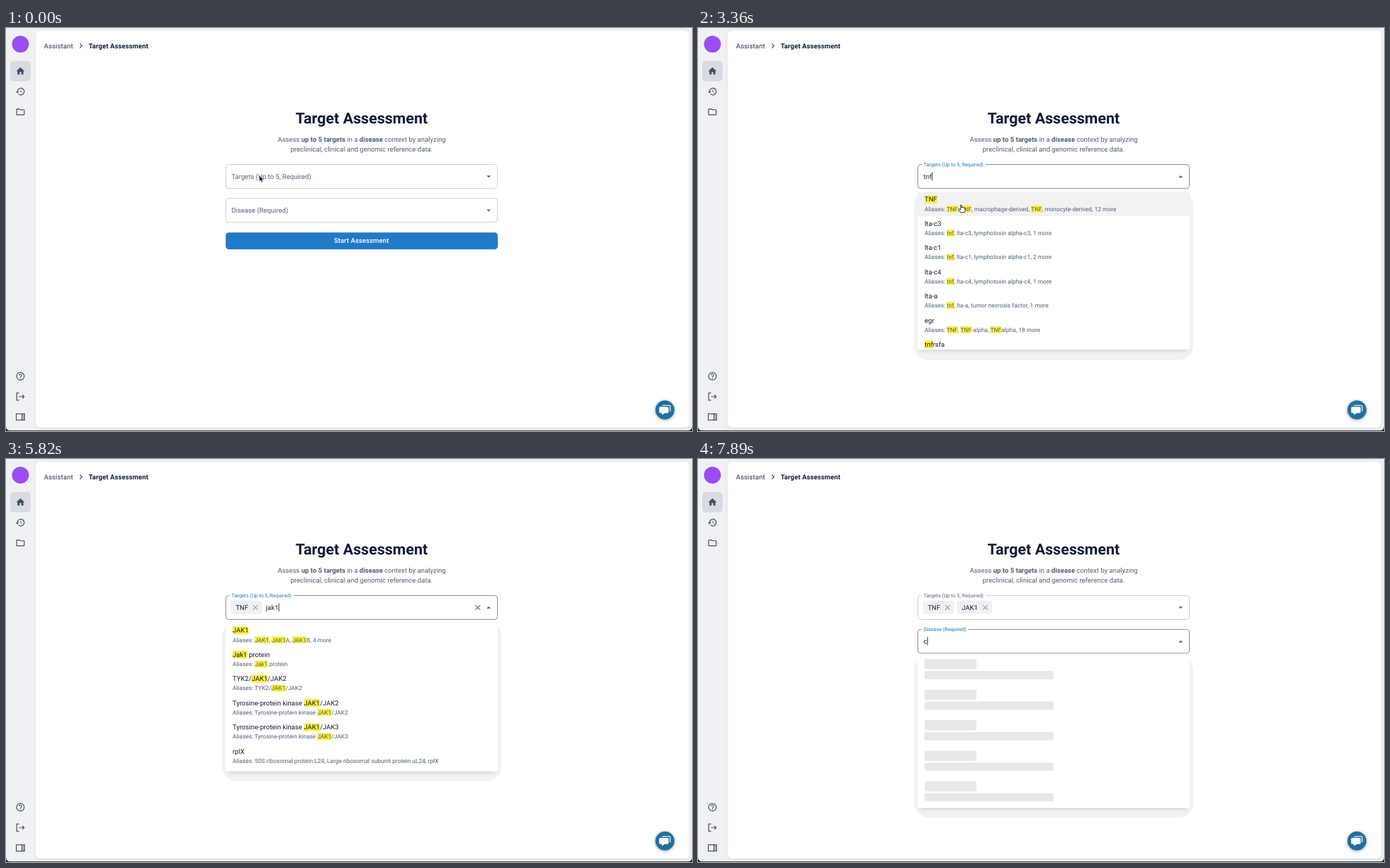
Animation, 975 px wide and 574 px high, one loop 8000 ms. Source, as an HTML page:

```html
<!DOCTYPE html>
<html lang="en">
<head>
<meta charset="utf-8">
<title>Target Assessment</title>
<style>
html, body { margin: 0; width: 975px; height: 574px; overflow: hidden; background: #15171c; }
body { position: relative; text-rendering: geometricPrecision; }
svg { position: absolute; left: 0; top: 0; font-family: Roboto, sans-serif; font-size: 9.6px; }
#halo, #menu { position: absolute; display: none; }
#halo { left: 307px; width: 397px; border-radius: 21px; background: rgba(0,0,0,.05); }
#menu { left: 312px; width: 387px; background: #fff; overflow: hidden; border-radius: 2.4px;
  box-shadow: 0 6px 5px -4px rgba(0,0,0,.13); }
#list text { white-space: pre; }
</style>
</head>
<body>
<svg id="page" width="975" height="574" viewBox="0 0 975 574">
  <defs>
    <filter id="soft" x="-30%" y="-30%" width="160%" height="160%"><feGaussianBlur stdDeviation="2"/></filter>
  </defs>
  <path d="M0 0H975V567Q975 573.3 969 573.3H6Q0 573.3 0 567Z" fill="#f0f1f4"/>
  <rect x="42" y="4" width="929" height="566" rx="7" fill="#ccd0d8" opacity=".7" filter="url(#soft)"/>
  <rect x="42" y="3.5" width="929" height="565.5" rx="7" fill="#fff"/>
  <circle cx="20.5" cy="23" r="12" fill="#9a4df0"/>
  <rect x="6" y="47" width="29" height="29" rx="5" fill="#d9dbe1"/>
  <g id="icons" fill="#424f67"></g>
  <g fill="none" stroke="#424f67" stroke-width="1.2">
    <path d="M18.6 519.8H15.2V530.2H18.6M18.4 525H25.6M23.2 522.3L25.9 525L23.2 527.7"/>
    <rect x="14.6" y="549.5" width="11.8" height="9"/>
    <path d="M22.6 549.5V558.5"/>
    <path d="M24.5 550.8V557.6" stroke-width="1.3" stroke-dasharray="1.6 1"/>
  </g>
  <text x="54" y="28.5" fill="#27324a" letter-spacing=".13">Assistant</text>
  <path d="M105 22.3l3 3.2-3 3.2" fill="none" stroke="#3c475c" stroke-width="1.2"/>
  <text x="117.4" y="28.5" font-weight="700" fill="#131d38" letter-spacing=".08">Target Assessment</text>
  <g text-anchor="middle">
    <text x="505.4" y="136" font-size="21.6" font-weight="700" fill="#111b38">Target Assessment</text>
    <g fill="#4f5b74">
      <text x="505.6" y="161.5">Assess <tspan font-weight="700">up to 5 targets</tspan> in a <tspan font-weight="700">disease</tspan> context by analyzing</text>
      <text x="505.4" y="176">preclinical, clinical and genomic reference data.</text>
    </g>
    <rect x="312.3" y="291.3" width="386.6" height="24" rx="4.5" fill="#217ac6"/>
    <text x="505.2" y="306.2" font-weight="500" fill="#fff" letter-spacing=".08">Start Assessment</text>
  </g>
  <g id="fields"></g>
  <circle cx="936.5" cy="544.8" r="14" fill="#000" opacity=".3" filter="url(#soft)"/>
  <circle cx="936.5" cy="544" r="13.5" fill="#20719f"/>
  <path d="M932.5 537.5H942.5Q944 537.5 944 539V546" fill="none" stroke="#fff" stroke-width="1.2"/>
  <path d="M930 539.5H940Q941.8 539.5 941.8 541.3V546.7Q941.8 548.5 940 548.5H936L932.3 551.3V548.5H930Q928.3 548.5 928.3 546.7V541.3Q928.3 539.5 930 539.5Z" fill="#fff"/>
</svg>
<div id="halo"></div>
<div id="menu"><svg id="list" width="387" height="230"></svg></div>
<svg width="975" height="574" viewBox="0 0 975 574">
  <g id="cursor">
    <circle id="ring" r="9.2" fill="none" stroke="#0c0d10" stroke-width="2"/>
    <path id="arrow" d="M0 0V8.6L2 6.8 3.4 10 5 9.3 3.6 6.2H6.3Z" fill="#000" stroke="#fff" stroke-width=".7"/>
    <g id="beam" fill="none">
      <path d="M-2.3-5Q0-5 0-3.8Q0-5 2.3-5M0-4V4M-2.3 5Q0 5 0 3.8Q0 5 2.3 5M-1.4 1H1.4" stroke="#fff" stroke-width="2" opacity=".7"/>
      <path d="M-2.3-5Q0-5 0-3.8Q0-5 2.3-5M0-4V4M-2.3 5Q0 5 0 3.8Q0 5 2.3 5M-1.4 1H1.4" stroke="#111" stroke-width="1"/>
    </g>
    <path id="hand" d="M-.8 6V.8Q0-.6 .8.8V4Q1.8 3.2 2.5 4.2Q3.6 3.6 4.2 4.7Q5.6 4.3 5.6 5.8V8L4.6 11H-.6L-3.6 6.9Q-3.6 5.4-2.3 5.8L-.8 7.2Z" fill="#fff" stroke="#111" stroke-width=".9"/>
  </g>
</svg>
<script>
const LOOP = 8000, STEP = 30, BLINK = 480;
const $ = id => document.getElementById(id);

function add(parent, tag, attrs, text) {
  const el = document.createElementNS('http://www.w3.org/2000/svg', tag);
  set(el, attrs);
  if (text) el.textContent = text;
  return parent.appendChild(el);
}
function set(el, attrs) {
  for (const k in attrs) el.setAttribute(k, attrs[k]);
}
const show = (el, on) => { el.style.display = on ? '' : 'none'; };

// Sidebar icons on a 24 unit grid
[
  [61.5, 'M10 20v-6h4v6h5v-8h3L12 3 2 12h3v8z'],
  [90.5, 'M13 3a9 9 0 0 0-9 9H1l4 4 4-4H6a7 7 0 1 1 2.06 4.94l-1.42 1.42A9 9 0 1 0 13 3zm-1 5v5l4.28 2.54.72-1.21-3.5-2.08V8z'],
  [119.5, 'M9.17 6l2 2H20v10H4V6h5.17M10 4H4a2 2 0 0 0-2 2v12a2 2 0 0 0 2 2h16a2 2 0 0 0 2-2V8a2 2 0 0 0-2-2h-8z'],
  [496, 'M11 18h2v-2h-2zM12 2a10 10 0 1 0 0 20 10 10 0 0 0 0-20zm0 18a8 8 0 1 1 0-16 8 8 0 0 1 0 16zm0-14a4 4 0 0 0-4 4h2a2 2 0 0 1 4 0c0 2-3 1.75-3 5h2c0-2.25 3-2.5 3-5a4 4 0 0 0-4-4z']
].forEach(([y, d]) => add($('icons'), 'path', { d, transform: `translate(13.3 ${y - 7.2}) scale(.6)` }));

// Schedules: value holds from its time on
const typed = [[0, ''], [1590, 't'], [1950, 'tn'], [2100, 'tnf'], [3660, ''], [4860, 'j'],
  [4980, 'ja'], [5070, 'jak'], [5370, 'jak1'], [6720, ''], [7890, 'c']];
const menus = [[0, ''], [720, 'hint'], [1590, 'wait'], [2610, 'tnf'], [3660, ''], [4350, 'hint'],
  [4860, 'wait'], [5820, 'jak1'], [6720, ''], [7290, 'hint'], [7890, 'wait']];
const focus = [[0, -1], [660, 0], [7230, 1]];
const kinds = [[0, 'arrow'], [300, 'beam'], [1620, ''], [3000, 'beam'], [3150, 'hand'], [3660, 'beam'],
  [4860, ''], [6150, 'beam'], [6660, 'hand'], [6720, 'beam'], [7890, '']];
const presses = [[660, 810], [3540, 3660], [4290, 4380], [6660, 6720], [7230, 7380]];
const extraBlinks = [660, 4320, 7230];
const path = [[0, 360, 210], [270, 360, 210], [360, 342, 210.5], [3000, 342, 210.5], [3330, 374, 251.8],
  [3900, 374, 251.8], [4260, 400, 211], [6150, 400, 211], [6660, 403, 250.2], [6960, 403, 250.2],
  [7200, 352, 259], [LOOP, 352, 259]];
const chipTimes = [3660, 6720];
const inputX = [320.5, 369.5, 423.5];

// Square brackets mark the matched part
const lists = {
  tnf: [
    ['[TNF]', '[TNF], [TNF], macrophage-derived, [TNF], monocyte-derived, 12 more'],
    ['lta-c3', '[tnf], lta-c3, lymphotoxin alpha-c3, 1 more'],
    ['lta-c1', '[tnf], lta-c1, lymphotoxin alpha-c1, 2 more'],
    ['lta-c4', '[tnf], lta-c4, lymphotoxin alpha-c4, 1 more'],
    ['lta-a', '[tnf], lta-a, tumor necrosis factor, 1 more'],
    ['egr', '[TNF], [TNF]-alpha, [TNF]alpha, 18 more'],
    ['[tnf]rsfa', '']
  ],
  jak1: [
    ['[JAK1]', '[JAK1], [JAK1]A, [JAK1]B, 4 more'],
    ['[Jak1] protein', '[Jak1] protein'],
    ['TYK2/[JAK1]/JAK2', 'TYK2/[JAK1]/JAK2'],
    ['Tyrosine-protein kinase [JAK1]/JAK2', 'Tyrosine-protein kinase [JAK1]/JAK2'],
    ['Tyrosine-protein kinase [JAK1]/JAK3', 'Tyrosine-protein kinase [JAK1]/JAK3'],
    ['rplX', '50S ribosomal protein L24, Large ribosomal subunit protein uL24, rplX']
  ]
};

function at(list, t) {
  let v = list[0][1];
  for (const [time, value] of list) if (time <= t) v = value;
  return v;
}

function cursorAt(t) {
  const i = path.findIndex(p => p[0] > t);
  const [t0, x0, y0] = path[i - 1], [t1, x1, y1] = path[i];
  const u = (t - t0) / (t1 - t0), e = u * u * (3 - 2 * u);
  return [x0 + (x1 - x0) * e, y0 + (y1 - y0) * e];
}

// cubic-bezier(0, 0, .2, 1)
function easeOut(x) {
  if (x <= 0) return 0;
  if (x >= 1) return 1;
  let lo = 0, hi = 1;
  for (let i = 0; i < 20; i++) {
    const s = (lo + hi) / 2;
    if (.6 * (1 - s) * s * s + s * s * s < x) lo = s; else hi = s;
  }
  return 3 * (1 - lo) * lo * lo + lo * lo * lo;
}

const cross = (x, y, r) => `M${x - r} ${y - r}l${2 * r} ${2 * r}m0 ${-2 * r}l${-2 * r} ${2 * r}`;

function makeField(y, name, notch, start) {
  const g = add($('fields'), 'g', {});
  return {
    y, notch, start,
    box: add(g, 'rect', { x: 312.5, y, width: 386, height: 34, rx: 4, fill: '#fff' }),
    gap: add(g, 'rect', { x: 318, y: y - 1, height: 2, fill: '#fff' }),
    label: add(g, 'text', {}, name),
    arrow: add(g, 'path', { fill: '#5b667c' }),
    input: add(g, 'text', { y: y + 20.5, fill: '#1a243c' }),
    caret: add(g, 'rect', { y: y + 10.8, width: .9, height: 12, fill: '#222' })
  };
}
const fields = [
  makeField(194.5, 'Targets (Up to 5, Required)', 91, 660),
  makeField(242.7, 'Disease (Required)', 66, 7230)
];

function makeChip(x, w, name) {
  const g = add($('fields'), 'g', {});
  add(g, 'rect', { x, y: 201.8, width: w, height: 19.2, rx: 2.4, fill: '#f0f1f2' });
  add(g, 'text', { x: x + 6.6, y: 214.9, fill: '#17213a' }, name);
  add(g, 'path', { d: cross(x + w - 9.6, 211.5, 3.4), stroke: '#687387', fill: 'none' });
  return g;
}
const chips = [makeChip(319.8, 44.4, 'TNF'), makeChip(368.2, 49.8, 'JAK1')];
const clear = add($('fields'), 'path', { d: cross(670.6, 211.5, 3.3), stroke: '#5b667c', 'stroke-width': 1.1, fill: 'none' });

function drawField(f, i, s) {
  const active = s.focus === i;
  const hover = s.hover === i;
  const p = easeOut((s.t - f.start) / 200);
  const open = Math.min(1, Math.max(0, (s.t - f.start - 50) / 100));
  set(f.box, { stroke: active || hover ? '#868e9c' : '#cdd1d8' });
  set(f.gap, { width: f.notch * open });
  set(f.label, {
    transform: `translate(${320.4 + .4 * p} ${f.y + 20.3 - 17.6 * p}) scale(${1 - .25 * p})`,
    fill: active ? '#2077b5' : '#55617a'
  });
  set(f.arrow, { d: active && s.menu ? `M683 ${f.y + 18.6}h6l-3-3z` : `M683 ${f.y + 15.7}h6l-3 3z` });
  const x = inputX[i ? 0 : s.chips];
  f.input.textContent = active ? s.text : '';
  set(f.input, { x });
  show(f.caret, active && s.caret);
  if (active) set(f.caret, { x: x + .2 + (s.text ? f.input.getComputedTextLength() : 0) });
}

// Lays out the parts one after another, marked ones on yellow
function richLine(str, y, size, fill) {
  let x = 10;
  str.split(/(\[.*?\])/).filter(Boolean).forEach(part => {
    const marked = part[0] === '[';
    const text = add($('list'), 'text', { x, y, fill, 'font-size': size }, marked ? part.slice(1, -1) : part);
    const width = text.getComputedTextLength();
    if (marked) {
      const back = add($('list'), 'rect', { x, y: y - .93 * size, width, height: 1.18 * size, fill: '#fbf03f' });
      text.before(back);
    }
    x += width;
  });
}
const bar = (y, width, height) => add($('list'), 'rect', { x: 10, y, width, height, rx: 2.4, fill: '#e7e8ea' });

let shown = null;
function drawMenu(kind, field, hot) {
  const key = kind + field + hot;
  if (key === shown) return;
  shown = key;
  const menu = $('menu'), halo = $('halo');
  menu.style.display = halo.style.display = kind ? 'block' : 'none';
  $('list').textContent = '';
  if (!kind) return;
  let h;
  if (kind === 'hint') {
    richLine('Start typing to search', 18.4, 9.6, '#4c5870');
    h = 31;
  } else if (kind === 'wait') {
    for (let i = 0; i < 5; i++) {
      bar(8 + 43.5 * i, 73.8, 14.4);
      bar(24.9 + 43.5 * i, 183.6, 11.8);
    }
    h = 219.5;
  } else {
    const rows = lists[kind];
    if (hot) add($('list'), 'rect', { y: 4.5, width: 387, height: 34.4, fill: '#f1f2f3' });
    rows.forEach(([name, alias], i) => {
      const y = 34.43 * i;
      richLine(name, y + 18.4, 9.6, '#131d36');
      if (alias) richLine('Aliases: ' + alias, y + 31.5, 8.45, '#515d74');
    });
    h = Math.min(229, 9.2 + 34.43 * rows.length);
  }
  const top = Math.round(fields[field].y + 34.4);
  menu.style.top = top + 'px';
  menu.style.height = h + 'px';
  halo.style.top = top + 3 + 'px';
  halo.style.height = h + 11.5 + 'px';
}

function draw(t) {
  const [x, y] = cursorAt(t);
  const kind = at(kinds, t), menu = at(menus, t);
  const resets = typed.map(e => e[0]).concat(extraBlinks).filter(v => v <= t);
  const s = {
    t, menu,
    focus: at(focus, t),
    text: at(typed, t),
    chips: chipTimes.filter(v => v <= t).length,
    caret: Math.floor((t - Math.max(...resets)) / BLINK) % 2 === 0
  };
  s.hover = kind === 'beam' ? fields.findIndex((f, i) => y > f.y && y < f.y + 34 && !(i && menu && s.focus === 0)) : -1;
  fields.forEach((f, i) => drawField(f, i, s));
  chips.forEach((c, i) => show(c, i < s.chips));
  show(clear, s.chips && s.focus === 0);
  drawMenu(menu, Math.max(0, s.focus), !!kind && y > 233.5);
  for (const k of ['arrow', 'beam', 'hand']) show($(k), k === kind);
  show($('ring'), presses.some(([a, b]) => t >= a && t < b));
  set($('cursor'), { transform: `translate(${x} ${y})` });
}

const began = performance.now();
function tick() {
  const t = (performance.now() - began) % LOOP;
  draw(Math.floor(t / STEP) * STEP);
  requestAnimationFrame(tick);
}
tick();
</script>
</body>
</html>
```
